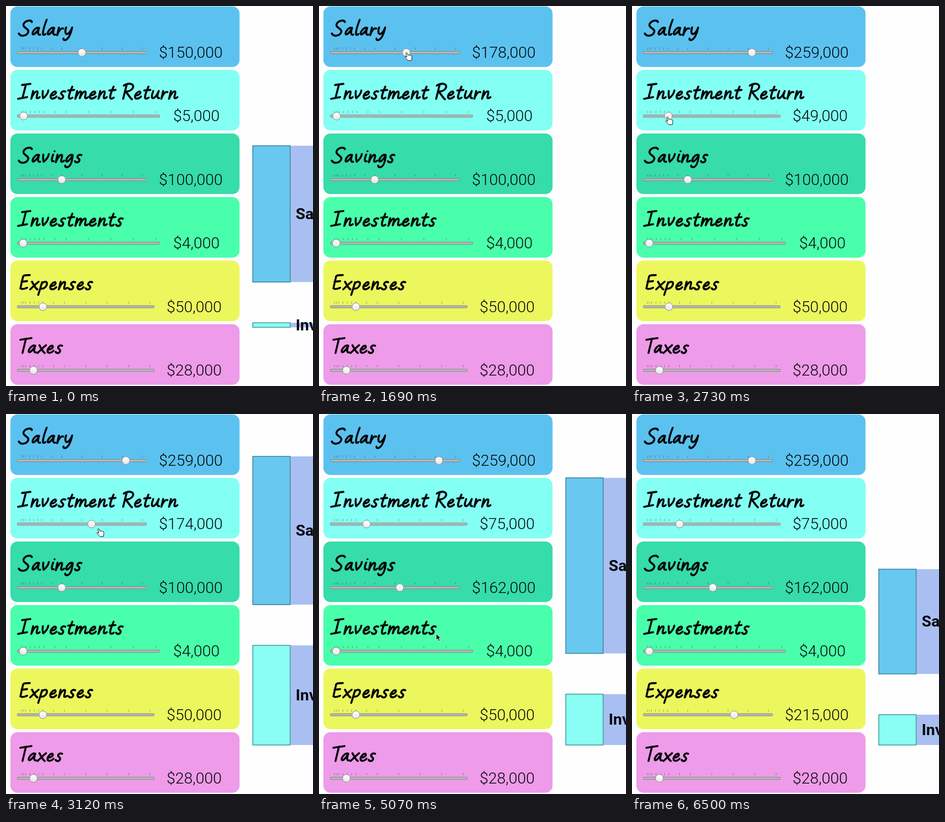
These frames come from a looping animation (558x690 px, 6.89 s). An HTML page:

```html
<!DOCTYPE html>
<html lang="en">
<head>
<meta charset="utf-8">
<title>Budget sliders</title>
<style>
  html, body { margin: 0; width: 100%; height: 100%; overflow: hidden; background: #fefefe; }
  svg { display: block; width: 558px; height: 690px; }
  text { font-family: Roboto, Arial, sans-serif; }
  .amount { font-size: 28.4px; font-weight: 350; fill: #050505; }
  .label { font-size: 28.5px; font-weight: 600; fill: #0a0a0e; }
  .script { fill: none; stroke: #050505; stroke-width: 3.6; stroke-linecap: round; stroke-linejoin: round; }
  .tick { stroke: #000; stroke-opacity: .32; stroke-width: 1; }
  .track { fill: #b9b9b9; stroke: #858585; stroke-width: 1; }
  .thumb { fill: url(#knob); stroke: #8d8d8d; stroke-width: 1; }
  .link { fill: #a9bff2; }
  .bar { stroke-width: 1.6; }
</style>
</head>
<body>
<svg id="stage" viewBox="0 0 558 690">
  <defs>
    <linearGradient id="knob" x2="0" y2="1">
      <stop stop-color="#fff"/><stop offset="1" stop-color="#e6e6e6"/>
    </linearGradient>
    <!-- Brush letters: baseline at y 0, data-w is the advance -->
    <path id="S" data-w="24" d="M23-24C20-29 9-26 8-19C8-13 19-12 18-6C16 2 5 3 1-3"/>
    <path id="I" data-w="22" d="M5-25L20-27M12-26L8-2M0 0L16-3"/>
    <path id="R" data-w="23" d="M8-25L4 0M3-24C12-30 22-27 20-20C18-15 12-13 7-13C11-10 15-3 20 1"/>
    <path id="E" data-w="21" d="M19-26C12-26 7-26 7-23L4-2C7 0 12-1 16-3M5-14L15-15"/>
    <path id="T" data-w="17" d="M2-24L22-27M12-26L8 0"/>
    <path id="a" data-w="17.5" d="M13-13C8-16 2-8 2-3C3 2 10-5 13-13C11-6 11 0 16-1"/>
    <path id="l" data-w="10" d="M8-28C5-18 2-6 4-1Q6 0 8-2"/>
    <path id="r" data-w="14" d="M4-14L2 0C4-8 8-14 12-12"/>
    <path id="y" data-w="17" d="M3-14C1-6 3-2 6-2C10-3 13-10 14-14C13-3 9 8 3 9Q0 9 0 6"/>
    <path id="n" data-w="18.6" d="M4-14L2 0C4-8 9-15 12-13C14-10 9-1 13-1Q15-1 17-3"/>
    <path id="v" data-w="16" d="M3-14C3-8 4-3 5-1C9-4 13-10 13-15"/>
    <path id="e" data-w="16" d="M3-6C8-6 12-9 11-12C9-16 2-9 2-4C3 2 10 0 13-4"/>
    <path id="s" data-w="15" d="M12-13C8-15 4-12 5-9C6-7 10-6 9-3C8 1 3 1 1-2"/>
    <path id="t" data-w="14.4" d="M9-22C6-13 3-5 5-1Q7 1 11-2M2-15L13-16"/>
    <path id="m" data-w="26" d="M4-14L2 0C4-7 8-14 11-13C13-11 10-5 10-1C12-8 16-14 19-13C22-10 17-1 21-1Q23-1 25-3"/>
    <path id="u" data-w="18" d="M4-14C2-7 1-1 5-1C9-2 12-8 14-14C12-7 11-1 16-1"/>
    <path id="i" data-w="9" d="M5-14C3-8 2 0 7-2M7-20L7-20.1"/>
    <path id="g" data-w="17" d="M13-13C8-16 2-8 2-3C3 2 10-5 13-13C13-2 11 8 5 9Q1 9 1 6"/>
    <path id="x" data-w="16.5" d="M3-14C6-10 9-3 14 0M15-14C10-10 5-4 1 0"/>
    <path id="p" data-w="18.5" d="M5-13L0 10M4-9C7-15 15-16 14-9C13-3 7 0 3-2"/>
  </defs>
  <g id="chart"></g>
  <g id="cards"></g>
  <g id="pointer">
    <path id="arrow" d="M0 0V11.5L2.7 9L4.7 13.5L6.8 12.5L4.9 8.3H8.5Z" fill="#111" stroke="#fff" stroke-width=".8"/>
    <path id="hand" d="M-1 1Q0-.8 1.3 1L2.8 5L4 4.2L5.3 5L6.6 4.6L7.6 5.6L9 5.4Q10.3 7 9.8 10L9 14.5H2.8L-2.5 8.8Q-3.3 7 -1 7.4L.8 8.4Z" fill="#fff" stroke="#222" stroke-width="1"/>
  </g>
</svg>
<script>
const LOOP = 6890, STEP = 130, MAX = 300;
const TICKS = [0, 5, 10, 20, 30, 40, 50, 75, 100, 150, 200, 250, 300];
// Track end and amount position by length of the amount
const LAYOUT = { 8: [256, 278], 7: [270, 292], 6: [280, 304] };

// keys: [ms, thousands of dollars]
const ROWS = [
  { name: 'Salary', color: '#5bc2f0', keys: [[1430, 150], [2210, 259]] },
  { name: 'Investment Return', color: '#83fff4', keys: [[2600, 5], [2990, 174], [3380, 174], [3770, 75]] },
  { name: 'Savings', color: '#36dcaa', keys: [[4290, 100], [4680, 162]] },
  { name: 'Investments', color: '#4affab', keys: [[0, 4]] },
  { name: 'Expenses', color: '#ecf75e', keys: [[5460, 50], [6110, 215]] },
  { name: 'Taxes', color: '#ee9be9', keys: [[0, 28]] }
];
// [ms, x, y]
const POINTER = [
  [780, 420, 150], [1040, 175, 83], [1300, 138, 85], [1430, 138, 85], [2210, 219, 83],
  [2600, 32, 200], [2990, 156, 204], [3120, 168, 208], [3380, 168, 208], [3770, 86, 204],
  [4030, 161, 287], [4290, 101, 315], [4680, 147, 316], [5070, 213, 399],
  [5460, 67, 547], [6110, 186, 547], [6500, 330, 640]
];

const $ = id => document.getElementById(id);

function add(parent, tag, attrs = {}) {
  const node = document.createElementNS('http://www.w3.org/2000/svg', tag);
  set(node, attrs);
  parent.append(node);
  return node;
}
function set(node, attrs) {
  for (const k in attrs) node.setAttribute(k, attrs[k]);
}

function at(keys, t, col = 1) {
  const i = keys.findIndex(k => k[0] > t);
  if (i === 0) return keys[0][col];
  if (i < 0) return keys[keys.length - 1][col];
  const [a, b] = [keys[i - 1], keys[i]];
  const p = (t - a[0]) / (b[0] - a[0]);
  return a[col] + (b[col] - a[col]) * p * p * (3 - 2 * p);
}

function write(parent, word) {
  const g = add(parent, 'g', {
    class: 'script', role: 'img', 'aria-label': word,
    transform: 'translate(22 53) skewX(-5)'
  });
  let x = 0;
  for (const c of word) {
    if (c === ' ') { x += 10; continue; }
    add(g, 'use', { href: '#' + c, x });
    x += +$(c).dataset.w;
  }
}

ROWS.forEach((row, i) => {
  row.top = 115.4 * i;
  const g = add($('cards'), 'g', { transform: `translate(0 ${row.top})` });
  add(g, 'rect', { x: 8, y: .7, width: 416.5, height: 110, rx: 13, fill: row.color });
  write(g, row.name);
  row.ticks = TICKS.map(() => add(g, 'line', { class: 'tick', y1: 75, y2: 79 }));
  row.track = add(g, 'rect', { class: 'track', x: 20.5, y: 82.5, height: 4, rx: 1.5 });
  row.thumb = add(g, 'circle', { class: 'thumb', cy: 84.5, r: 7 });
  row.amount = add(g, 'text', { class: 'amount', y: 94 });
});

const BARS = [['Salary', '#68c8f0', '#44879f'], ['Investment Return', '#8afdf4', '#4b9f9c']].map(
  ([name, fill, stroke]) => {
    const link = add($('chart'), 'rect', { class: 'link', x: 516, width: 42 });
    const bar = add($('chart'), 'rect', { class: 'bar', x: 448.5, width: 68, fill, stroke });
    const label = add($('chart'), 'text', { class: 'label', x: 526.5 });
    label.textContent = name;
    return { link, bar, label };
  });

function drawRow(row, value) {
  const text = '$' + Math.round(value) + ',000';
  const [end, x] = LAYOUT[text.length];
  const pos = v => 28 + (end - 36) * v / MAX;
  row.amount.textContent = text;
  set(row.amount, { x });
  set(row.track, { width: end - 21 });
  set(row.thumb, { cx: pos(value) });
  row.ticks.forEach((tick, i) => set(tick, { x1: pos(TICKS[i]), x2: pos(TICKS[i]) }));
}

function drawBar({ link, bar, label }, y, height) {
  set(link, { y, height });
  set(bar, { y, height });
  set(label, { y: y + height / 2 + 9.6 });
}

function drawChart([salary, gain, ...spent]) {
  const out = spent.reduce((a, b) => a + b);
  const scale = Math.min(450 / (salary + gain), 300.3 / out);
  const [h1, h2] = [salary * scale, gain * scale];
  const bottom = gain < 10 ? 583.5 : 601;
  drawBar(BARS[0], Math.max(77, bottom - h2 - 74 - h1), h1);
  drawBar(BARS[1], bottom - h2, h2);
}

function drawPointer(t) {
  const [x, y] = [at(POINTER, t, 1), at(POINTER, t, 2)];
  const over = x < 275 && ROWS.some(r => Math.abs(r.top + 84.5 - y) < 11);
  set($('pointer'), {
    transform: `translate(${x} ${y})`,
    visibility: t >= 780 && t < 6500 ? 'visible' : 'hidden'
  });
  set($('hand'), { display: over ? 'inline' : 'none' });
  set($('arrow'), { display: over ? 'none' : 'inline' });
}

function draw(now) {
  const t = Math.floor(now % LOOP / STEP) * STEP;
  const values = ROWS.map(r => at(r.keys, t));
  ROWS.forEach((row, i) => drawRow(row, values[i]));
  // The chart is blank while it rebuilds after a change
  const busy = ROWS.some((r, i) => at(r.keys, t - STEP) !== values[i]);
  set($('chart'), { visibility: busy ? 'hidden' : 'visible' });
  drawChart(values);
  drawPointer(t);
}

const start = performance.now();
function loop() {
  draw(performance.now() - start);
  requestAnimationFrame(loop);
}
loop();
</script>
</body>
</html>
```
